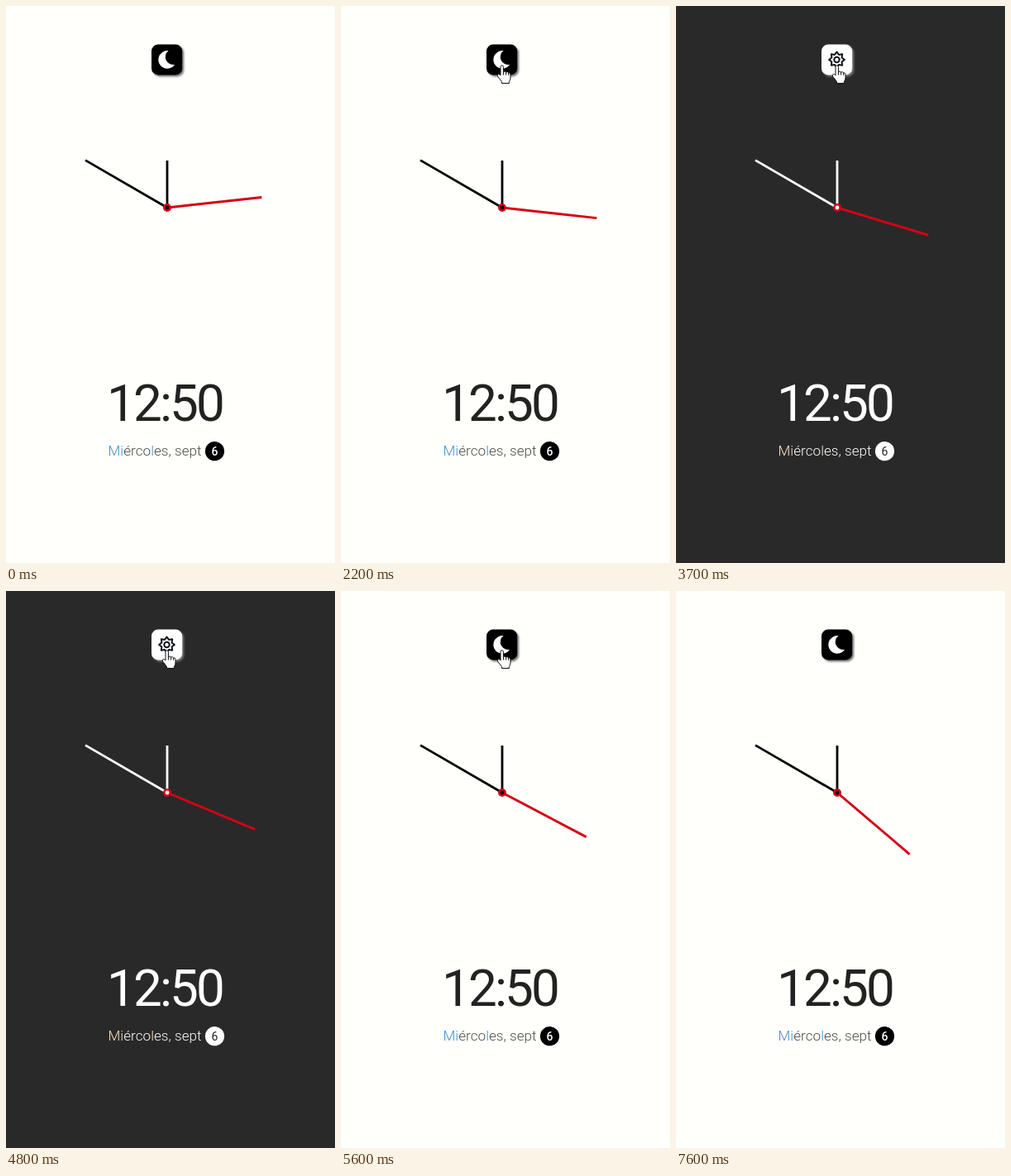
These frames come from a looping animation (398 px wide and 674 px high, 7.7 s). An HTML page:

```html
<!DOCTYPE html>
<html lang="es">
<head>
<meta charset="utf-8">
<title>Reloj</title>
<style>
html, body { margin: 0; width: 100%; height: 100%; overflow: hidden; background: #fffffc; }
svg { display: block; }
text { font-family: Roboto, sans-serif; }
#date { font-weight: 300; }
#button { filter: drop-shadow(2px 2px 1.2px #777); }
#cursor path { fill: #fff; stroke: #111; stroke-width: 1; stroke-linejoin: round; }
</style>
</head>
<body>
<svg width="398" height="674" viewBox="0 0 398 674">
  <rect id="bg" width="398" height="674"/>
  <rect id="button" x="176" y="46.6" width="37.2" height="36.8" rx="8"/>
  <path id="moon" fill="#fff" d="M196.5 54.2A10.8 10.8 0 1 0 204.2 70.7A9.3 9.3 0 0 1 196.5 54.2Z"/>
  <g id="gear" fill="none" stroke="#10131a" stroke-width="2" stroke-linejoin="round">
    <path id="teeth"/>
    <circle cx="194.5" cy="65" r="3.2"/>
  </g>
  <path id="hands" fill="none" stroke-width="2.8" d="M96 186.6L195 244V187"/>
  <path id="second" stroke="#d60014" stroke-width="2.9" d="M195 244h115"/>
  <circle id="hub" cx="195" cy="244" r="3.7" stroke="#d60014" stroke-width="2.6"/>
  <text id="time" x="122" y="502.3" font-size="62" letter-spacing="-2.9">12:50</text>
  <text id="date" x="123.5" y="544" font-size="17.15"><tspan class="tint">Mi</tspan>érco<tspan class="tint">l</tspan>es, sept</text>
  <circle id="badge" cx="252.5" cy="538.7" r="11.6"/>
  <text id="day" x="252.5" y="543.6" font-size="14" text-anchor="middle">6</text>
  <g id="cursor">
    <path id="arrow" d="M0 0V16l3.7-3.5 2.6 6 2.5-1-2.6-6H11z"/>
    <path id="pointer" d="M-2 12V1.5a1.7 1.7 0 0 1 3.4 0V7.5q2-1 3.2.5q2-.8 3 .8q2.3-.2 2.4 1.9V15q0 2.5-1.6 4.5V21.5H-.5V19.5L-5 13.8Q-6.5 11.4-4.8 10.6Q-3.5 10-2 12ZM1.4 7.5v4M4.6 8v3.5M7.6 8.8v3"/>
  </g>
</svg>
<script>
const LOOP = 7700, STEP = 100;
const $ = id => document.getElementById(id);
const tints = document.querySelectorAll('.tint');

// Each key is [time, value, value...]
const angleKeys = [[0, -6.26], [2000, 5.8], [2100, 5.8], [2200, 6.3], [2300, 7.5],
  [3700, 16.8], [5000, 23.8], [6500, 33.8], [7600, 40.4]];
const cursorKeys = [[1200, 178, -22], [1300, 179, -4], [1600, 190, 60], [2000, 195, 72],
  [6100, 195, 72], [6500, 181, 41], [6600, 179.5, 22], [6700, 178.5, 7]];

function sample(keys, t) {
  let i = 1;
  while (i < keys.length - 1 && t > keys[i][0]) i++;
  const a = keys[i - 1], b = keys[i];
  const k = Math.min(1, Math.max(0, (t - a[0]) / (b[0] - a[0])));
  return a.slice(1).map((v, n) => v + (b[n + 1] - v) * k);
}

const easeOut = (t, start, length) =>
  1 - (1 - Math.min(1, Math.max(0, (t - start) / length))) ** 2;

// How dark the theme is, 0 to 1
const darkness = (t, length) => easeOut(t, 2285, length) - easeOut(t, 4988, length);

function gray(from, to, k) {
  const v = Math.round(from + (to - from) * k);
  return `rgb(${v},${v},${v})`;
}

const fill = (id, color) => $(id).setAttribute('fill', color);
const show = (id, on) => $(id).setAttribute('visibility', on ? 'visible' : 'hidden');

const teeth = Array.from({ length: 16 }, (_, i) => {
  const a = i * Math.PI / 8, r = i % 2 ? 6.6 : 9.4;
  return `${194.5 + r * Math.sin(a)} ${65 - r * Math.cos(a)}`;
});
$('teeth').setAttribute('d', `M${teeth.join('L')}Z`);

function draw(t) {
  const dark = t > 2285 && t < 4988;
  const k = darkness(t, 500);
  const ink = gray(0, 255, k), dateInk = gray(76, 255, k);

  fill('bg', dark ? '#292929' : '#fffffc');
  fill('button', gray(0, 255, darkness(t, 180)));
  show('moon', !dark);
  show('gear', dark);

  $('hands').setAttribute('stroke', ink);
  fill('hub', ink);
  fill('badge', ink);
  fill('time', gray(34, 255, k));
  fill('date', dateInk);
  fill('day', gray(255, 34, k));
  $('day').style.fontWeight = k < .5 ? 500 : 400;
  const tint = k === 0 ? '#3f93c4' : k === 1 ? '#ffe6c0' : dateInk;
  tints.forEach(el => el.setAttribute('fill', tint));

  $('second').setAttribute('transform', `rotate(${sample(angleKeys, t)[0]} 195 244)`);

  const [x, y] = sample(cursorKeys, t);
  const visible = t >= 1200 && t < 6800, over = y >= 47;
  $('cursor').setAttribute('transform', `translate(${x} ${y})`);
  show('arrow', visible && !over);
  show('pointer', visible && over);
}

const start = performance.now();
function tick() {
  const t = (performance.now() - start) % LOOP;
  draw(Math.floor(t / STEP) * STEP);
  requestAnimationFrame(tick);
}
tick();
</script>
</body>
</html>
```
